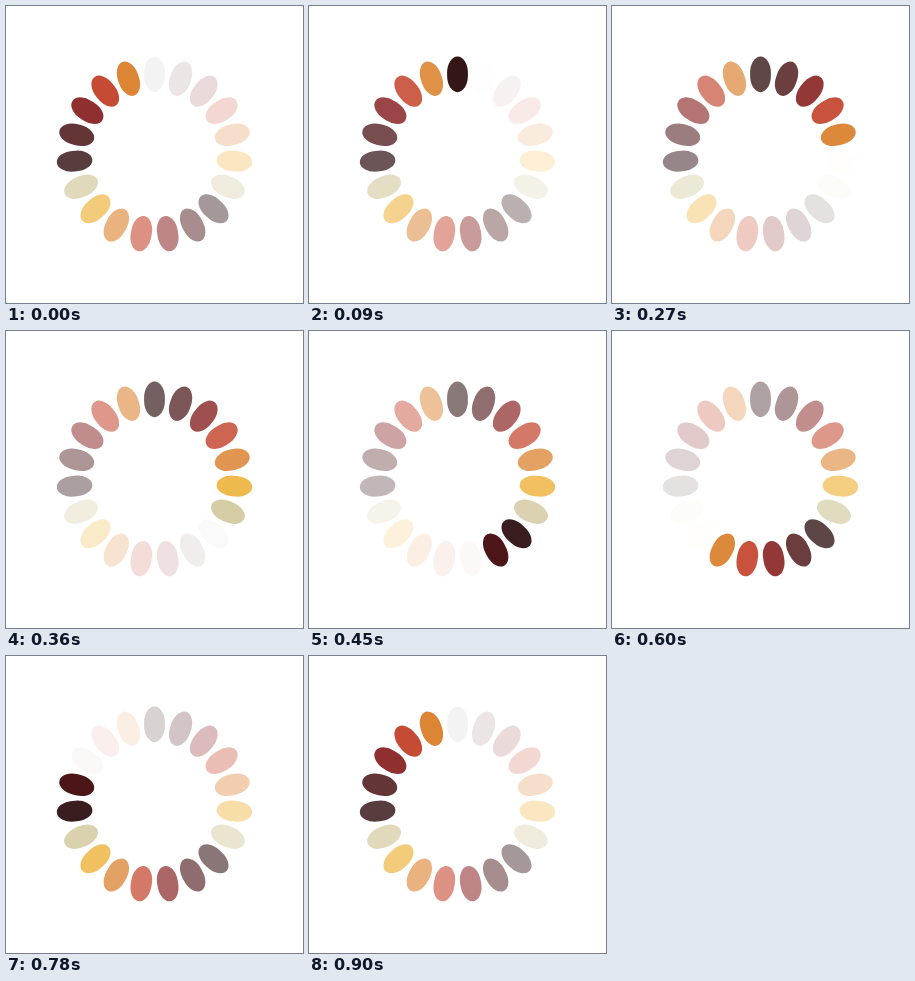
An HTML page for the animation above (930 ms loop, 297 px wide and 297 px high).

```html
<!DOCTYPE html>
<html lang="en">
<head>
<meta charset="utf-8">
<title>Spinner</title>
<style>
  html, body { margin: 0; height: 100%; overflow: hidden; background: #fff; }
  svg { display: block; width: 100%; height: 100%; }
</style>
</head>
<body>
<svg id="spinner" viewBox="0 0 100 100"></svg>
<script>
  const COUNT = 19;
  const STEP = 30;    // ms per step
  const STEPS = 30;   // steps per turn, then one step of rest
  const COLORS = ['#2a0a0b', '#481012', '#821717', '#c3422a', '#dc8535', '#eeb43e', '#d5cca4'];

  const spinner = document.getElementById('spinner');

  const petals = Array.from({ length: COUNT }, (_, i) => {
    const petal = document.createElementNS('http://www.w3.org/2000/svg', 'rect');
    const attrs = {
      x: 46.5, y: 17, width: 7, height: 12, rx: 3.5, ry: 5.5,
      fill: COLORS[i % COLORS.length],
      transform: `rotate(${i * 360 / COUNT} 50 50)`
    };
    for (const name in attrs) petal.setAttribute(name, attrs[name]);
    spinner.append(petal);
    return petal;
  });

  // Each petal lights up in turn and fades linearly over one turn.
  function draw(time) {
    const step = Math.floor(time / STEP) % (STEPS + 1);
    const turn = (step % STEPS) / STEPS;
    petals.forEach((petal, i) => {
      const phase = (turn + (COUNT - 1 - i) / COUNT) % 1;
      petal.setAttribute('opacity', 1 - phase);
    });
  }

  const start = performance.now();
  function tick() {
    draw(performance.now() - start);
    requestAnimationFrame(tick);
  }
  tick();
</script>
</body>
</html>
```
